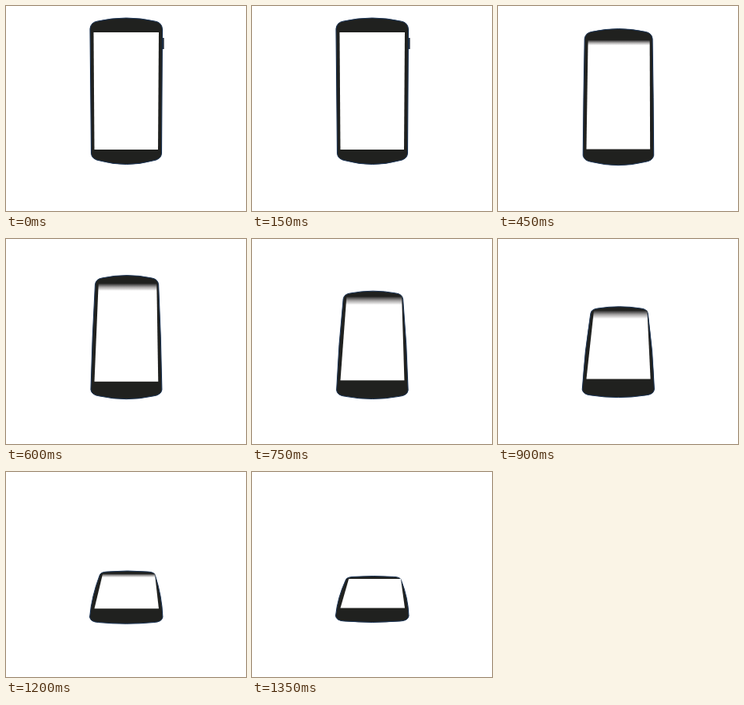
Recreate the animation shown at these times as an HTML page with a canvas. Size 300 by 257 pixels, loop 1500 ms.

```html
<!DOCTYPE html>
<html lang="en">
<head>
<meta charset="utf-8">
<title>Tilting phone</title>
<style>
html, body { margin: 0; width: 100%; height: 100%; overflow: hidden; background: #fff; }
canvas { display: block; }
</style>
</head>
<body>
<canvas id="stage" width="300" height="257"></canvas>
<script>
const ctx = document.getElementById('stage').getContext('2d');
const STEP = 150, STEPS = 10, TRAVEL = 115.5;

const mix = (a, b, k) => a + (b - a) * k;

// Drop of the top edge: a rest, then speeding up, steady fall, sudden stop.
function fall(step) {
  const x = Math.max(0, step - 1);
  const drop = x < 3 ? 3.4 * x * x : 30.6 + 19.6 * (x - 3);
  return Math.min(drop, TRAVEL);
}

function drawBody(tilt, narrow, swell) {
  const top = mix(15, 130.5, tilt);
  const bottom = mix(198.5, 188.5, tilt) + 6.5 * swell;
  const left = mix(105, 117, narrow), right = mix(195.5, 186.5, narrow);
  const lowLeft = mix(106.5, 104.5, tilt), lowRight = mix(194.5, 196, tilt);
  const arch = mix(5.5, 1.2, tilt), sag = mix(6, 2, tilt);
  const shoulder = top + arch + mix(8, 4, tilt);
  const hip = bottom - mix(13, 8, tilt);
  const bow = 4 * tilt, sideY = (shoulder + hip) / 2;
  const crown = top + arch * .75, base = bottom - sag * .75;

  ctx.beginPath();
  ctx.moveTo(left, shoulder);
  ctx.quadraticCurveTo(left + 1, top + arch, left + 9, crown);
  ctx.quadraticCurveTo((left + right) / 2, top - arch * .75, right - 9, crown);
  ctx.quadraticCurveTo(right - 1, top + arch, right, shoulder);
  ctx.quadraticCurveTo((right + lowRight) / 2 + bow, sideY, lowRight, hip);
  ctx.quadraticCurveTo(lowRight - 1, bottom - sag, lowRight - 11, base);
  ctx.quadraticCurveTo((lowLeft + lowRight) / 2, bottom + sag * .75, lowLeft + 11, base);
  ctx.quadraticCurveTo(lowLeft + 1, bottom - sag, lowLeft, hip);
  ctx.quadraticCurveTo((left + lowLeft) / 2 - bow, sideY, left, shoulder);
  ctx.fillStyle = '#20211f';
  ctx.fill();
  ctx.strokeStyle = '#1c3557';
  ctx.stroke();
}

function drawScreen(tilt, narrow, swell) {
  const top = mix(15, 130.5, tilt) + mix(18, 3.5, narrow);
  const bottom = 180 - 9.5 * tilt ** 1.5;
  const shade = ctx.createLinearGradient(0, top, 0, top + .5 + 10 * Math.sqrt(swell));
  shade.addColorStop(0, '#282828');
  shade.addColorStop(.5, '#a8a6a6');
  shade.addColorStop(1, '#fff');
  ctx.fillStyle = shade;
  ctx.beginPath();
  ctx.moveTo(mix(109.5, 121, narrow), top);
  ctx.lineTo(mix(191, 186, narrow), top);
  ctx.lineTo(mix(190, 191, tilt), bottom);
  ctx.lineTo(110.5, bottom);
  ctx.fill();
}

function frame() {
  const tilt = fall(Math.floor(performance.now() / STEP) % STEPS) / TRAVEL;
  const narrow = 1 - (1 - tilt) ** 2.5;
  const swell = Math.max(0, Math.sin(Math.PI * tilt));
  ctx.fillStyle = '#fff';
  ctx.fillRect(0, 0, 300, 257);
  if (tilt === 0) {
    ctx.fillStyle = '#1b2533';
    ctx.fillRect(194, 40, 3.5, 14);
  }
  drawBody(tilt, narrow, swell);
  drawScreen(tilt, narrow, swell);
  requestAnimationFrame(frame);
}
frame();
</script>
</body>
</html>
```
